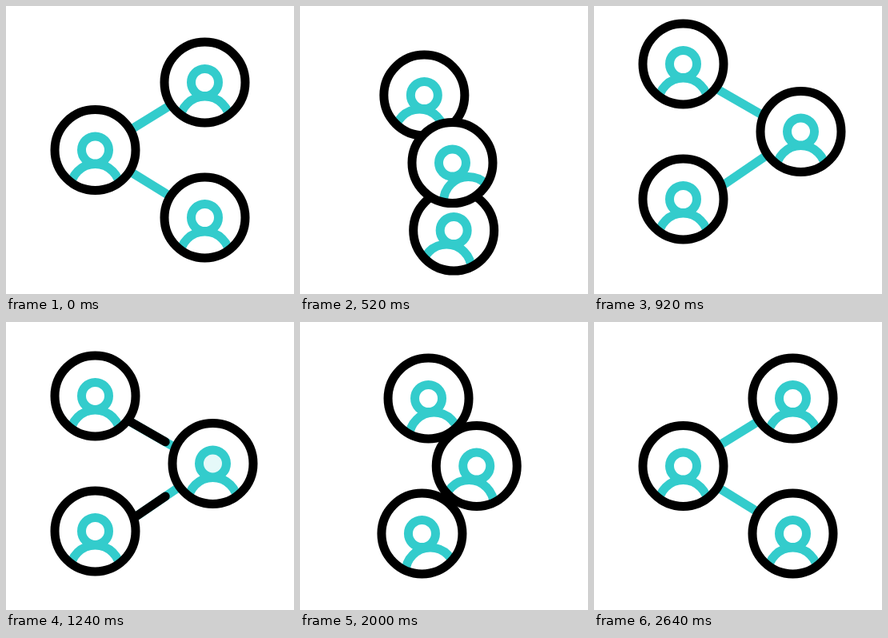
Write an HTML page that moves like this. It is 360x360 px and loops after 3000 ms.

```html
<!DOCTYPE html>
<html lang="en">
<head>
<meta charset="utf-8">
<title>Share network</title>
<style>
  html, body { margin: 0; width: 100%; height: 100%; overflow: hidden; background: #fff; }
  svg { display: block; width: 100vw; height: 100vh; }
  .ring, .person, .link { fill: none; stroke-width: 11; }
  .ring { stroke: #000; }
  .person, .link { stroke: #33cccc; }
  .pulse { stroke: #000; stroke-linecap: round; }
</style>
</head>
<body>
<svg viewBox="0 0 360 360">
  <defs>
    <clipPath id="inside"><circle r="50"/></clipPath>
  </defs>
  <g id="links"></g>
  <g id="nodes"></g>
</svg>
<script>
const LOOP = 3000, STEP = 40;
const OUT = [80, 920], BACK = [1740, 2620];

const clamp = v => Math.min(1, Math.max(0, v));
const span = (t, [a, b]) => clamp((t - a) / (b - a));
const mix = (a, b, k) => a + (b - a) * k;
const sine = k => (1 - Math.cos(Math.PI * k)) / 2;
const smooth = k => k * k * (3 - 2 * k);
const plateau = k => smooth(clamp(Math.min(k, 1 - k) * 4));

function bezier(x1, y1, x2, y2) {
  const at = (a, b, s) => 3 * (1 - s) ** 2 * s * a + 3 * (1 - s) * s * s * b + s ** 3;
  return x => {
    if (x <= 0 || x >= 1) return clamp(x);
    let lo = 0, hi = 1;
    for (let i = 0; i < 24; i++) {
      const mid = (lo + hi) / 2;
      if (at(x1, x2, mid) < x) lo = mid; else hi = mid;
    }
    return at(y1, y2, lo);
  };
}

// lean: how far the shoulders run ahead on the way out and back
const top3 = { from: 248.5, to: 111.5, y: 95.5, lean: [-6, 7],
  out: bezier(.22, .1, .56, 1), back: bezier(.22, .1, .56, 1) };
const low = { from: 248.5, to: 111.5, y: 264.5, lean: [-9, 10.5],
  out: bezier(.42, 0, .74, .9), back: bezier(.23, .1, .72, 1) };
const hub = { from: 111.5, to: 258.5, y: 180, lean: [20, -9.5],
  out: sine, back: bezier(.31, 0, .55, 1) };
const nodes = [top3, low, hub];

// shift: vertical offset of the outer and hub ends in the swapped layout
const links = [
  { node: top3, rest: 2, shift: [7, 7], bow: -14 },
  { node: low, rest: 0, shift: [16.5, .5], bow: 0 }
];

function add(parent, tag, attrs = {}) {
  const el = document.createElementNS("http://www.w3.org/2000/svg", tag);
  for (const k in attrs) el.setAttribute(k, attrs[k]);
  return parent.appendChild(el);
}
const set = (el, attrs) => { for (const k in attrs) el.setAttribute(k, attrs[k]); };

const linkLayer = document.getElementById("links");
for (const l of links) {
  l.line = add(linkLayer, "line", { class: "link" });
  l.pulse = add(linkLayer, "line", { class: "link pulse" });
}
const nodeLayer = document.getElementById("nodes");
for (const n of nodes) {
  n.g = add(nodeLayer, "g");
  add(n.g, "circle", { r: 50.5, fill: "#fff" });
  const clip = add(n.g, "g", { "clip-path": "url(#inside)" });
  n.body = add(clip, "circle", { class: "person", cy: 48.5, r: 31 });
  add(n.g, "circle", { r: 14, fill: "#fff" });
  n.glow = add(n.g, "circle", { r: 14, fill: "#33cccc", opacity: 0 });
  add(n.g, "circle", { class: "person", r: 17 });
  add(n.g, "circle", { class: "ring", r: 50.5 });
}

const BOB = [[80, 0], [490, 16.5], [920, -23], [1340, 0]];
function bob(t) {
  for (let i = 1; i < BOB.length; i++) {
    const [a, from] = BOB[i - 1], [b, to] = BOB[i];
    if (t < b) return mix(from, to, sine(span(t, [a, b])));
  }
  return 0;
}

function draw(t) {
  const dy = bob(t), out = span(t, OUT), back = span(t, BACK);
  for (const n of nodes) {
    n.p = n.out(out) - n.back(back);
    n.x = mix(n.from, n.to, n.p);
    n.cy = n.y + dy;
    set(n.g, { transform: `translate(${n.x} ${n.cy})` });
    set(n.body, { cx: n.lean[0] * plateau(out) + n.lean[1] * plateau(back) });
  }

  const grow = sine(span(t, [920, 1340])), pass = sine(span(t, [1340, 1660]));
  const tail = mix(.25, .72, pass), head = mix(.25 + .4 * grow, .72, pass);
  for (const l of links) {
    const n = l.node, bow = l.bow * Math.sin(Math.PI * n.p);
    const y1 = n.cy + mix(l.rest, l.shift[0], n.p) + bow;
    const y2 = hub.cy + mix(l.rest, l.shift[1], n.p) + bow;
    const part = (a, b) => ({
      x1: mix(n.x, hub.x, a), y1: mix(y1, y2, a),
      x2: mix(n.x, hub.x, b), y2: mix(y1, y2, b)
    });
    set(l.line, part(0, 1));
    set(l.pulse, part(tail, head));
    l.pulse.style.display = t > 920 && t < 1660 ? "" : "none";
  }
  set(hub.glow, { opacity: sine(span(t, [1180, 1440])) * (1 - sine(span(t, [1440, 1660]))) });
}

const start = performance.now();
function tick() {
  const t = (performance.now() - start) % LOOP;
  draw(Math.floor(t / STEP) * STEP);
  requestAnimationFrame(tick);
}
tick();
</script>
</body>
</html>
```
